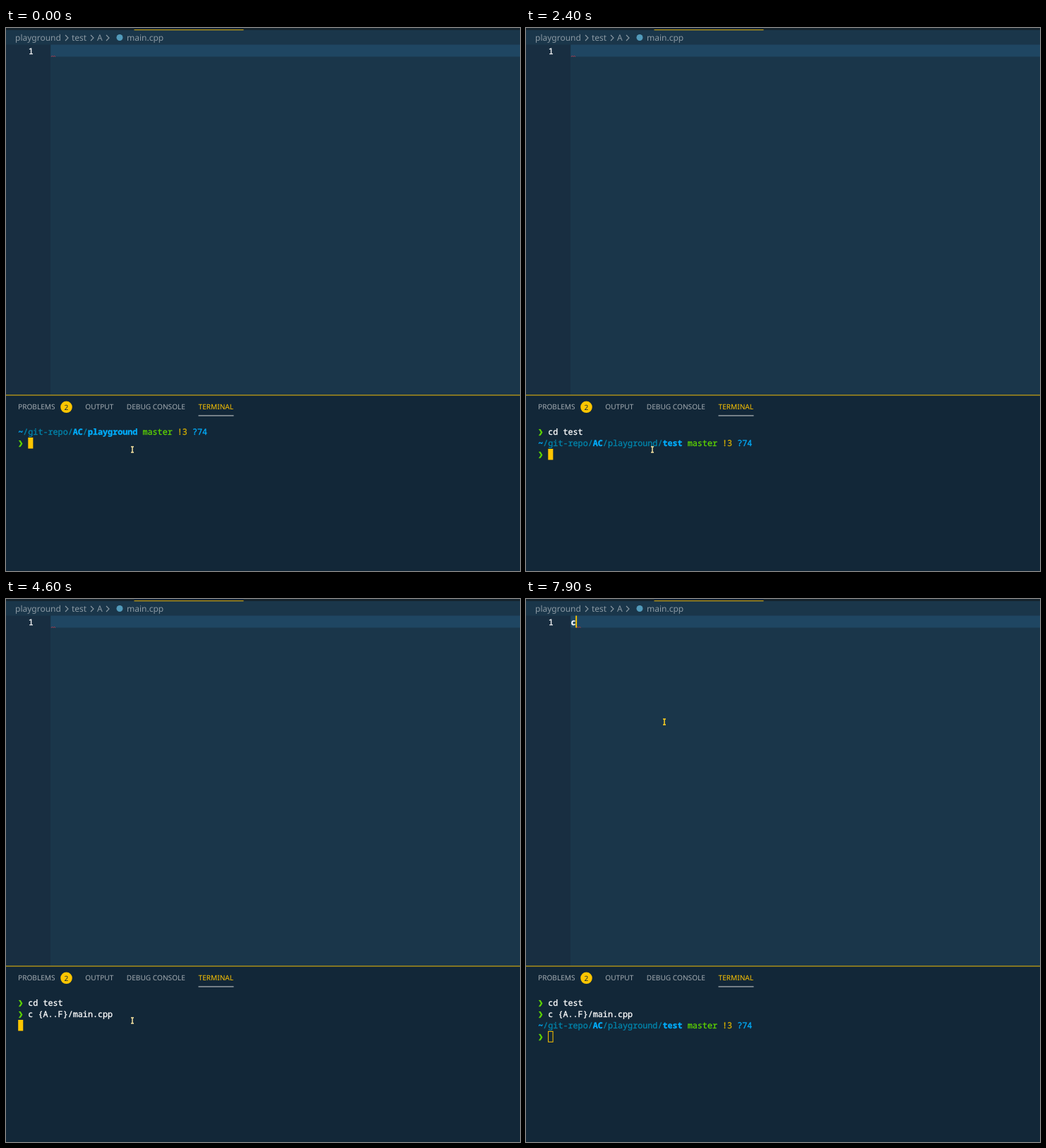
An HTML page for the animation above (8 s loop, 728 px wide and 769 px high).

```html
<!DOCTYPE html>
<html lang="en">
<head>
<meta charset="utf-8">
<title>Editor and terminal</title>
<style>
html, body { margin: 0; width: 100%; height: 100%; overflow: hidden; background: #1a364a; }
svg { display: block; width: 728px; height: 769px; }
text { white-space: pre; text-rendering: geometricPrecision; fill: currentColor; }
.crumb { font: 12px "Noto Sans", sans-serif; color: #8b99a3; }
.tab { font: 10.15px "Noto Sans", sans-serif; color: #a3abb1; }
.mono { font: 11.75px "Noto Sans Mono", "DejaVu Sans Mono", monospace; color: #fff; stroke: currentColor; stroke-width: .3; }
.mono text { stroke: currentColor; }
.bold { font-weight: 700; }
.dim { color: #0087af; }
.dir { color: #00afff; font-weight: 700; }
.new { color: #00afff; }
.ok { color: #5fd700; }
.mark { color: #5fd700; font-weight: 700; stroke-width: .6; }
.mod { color: #d7af00; }
.hint { color: #0050a4; }
.gold { color: #ffc600; }
.dark { color: #122738; }
.line { fill: none; stroke: #8b99a3; stroke-width: 1.1; }
</style>
</head>
<body>
<svg viewBox="0 0 728 769">
  <rect width="728" height="769" fill="#1a364a"/>
  <rect width="728" height="3" fill="#15232d"/>
  <rect x="181.5" y="2.2" width="155" height="1" fill="#e6b60a"/>
  <rect y="23.5" width="63" height="496" fill="#182e41"/>
  <rect x="63.3" y="23.6" width="665" height="17" fill="#1f4662"/>

  <g class="crumb">
    <text x="13" y="18">playground</text>
    <text x="93" y="18">test</text>
    <text x="129" y="18">A</text>
    <text x="171" y="18">main.cpp</text>
  </g>
  <path class="line" d="M84 10l4 4-4 4M120 10l4 4-4 4M142 10l4 4-4 4"/>
  <circle cx="161" cy="13.5" r="4.5" fill="#519aba"/>

  <text class="mono" x="31.8" y="37.3">1</text>
  <path id="squiggle" d="M64 41l1.5-1.8 1.5 1.6 1.5-1.6 1.5 1.8" fill="none" stroke="#b03a48" stroke-width=".9"/>
  <text id="typed" class="mono bold" x="63.5" y="37">c</text>
  <rect id="caret" y="23.6" width="1.8" height="17" fill="#ffc600"/>

  <rect y="520" width="728" height="249" fill="#122738"/>
  <rect y="519.5" width="728" height="1" fill="#f0bc06"/>
  <g class="tab">
    <text x="17" y="540">PROBLEMS</text>
    <text x="112.3" y="540">OUTPUT</text>
    <text x="170.8" y="540">DEBUG CONSOLE</text>
    <text class="gold" x="272.5" y="540">TERMINAL</text>
  </g>
  <circle cx="85.5" cy="536.8" r="8.3" fill="#ffc600"/>
  <text class="tab dark" x="85.5" y="540.6" text-anchor="middle">2</text>
  <rect x="272.5" y="548.5" width="50" height="1" fill="#d5d8d6"/>

  <g id="term" class="mono"></g>
  <rect id="block"/>
  <path id="mouse" d="M-2-4h4M0-4v8M-2 4h4" fill="none" stroke-width="1.5"/>
</svg>
<script>
const LOOP = 8000, LEFT = 17.2, TOP = 564, CELL = 7.05, ROW = 16;
const $ = id => document.getElementById(id);
const set = (el, attrs) => { for (const k in attrs) el.setAttribute(k, attrs[k]); };

// A row is a list of [class, text] runs.
const status = [['ok', ' master'], ['mod', ' !3'], ['new', ' ?74']];
const home = [['dir', '~'], ['dim', '/git-repo/'], ['dir', 'AC'], ['dim', '/'], ['dir', 'playground'], ...status];
const inner = [['dir', '~'], ['dim', '/git-repo/'], ['dir', 'AC'], ['dim', '/playground/'], ['dir', 'test'], ...status];
const cmd = (text = '', hint = '') =>
  [['mark', '❯ '], [text === 'c' ? 'bold' : '', text], ['hint', hint]];

const file = 'c {A..F}/main.cpp';
const first = (text, hint) => ({ rows: [home, cmd(text, hint)], col: 2 + text.length, row: 1 });
const second = (text, hint) => ({ rows: [cmd('cd test'), inner, cmd(text, hint)], col: 2 + text.length, row: 2 });
const done = { rows: [cmd('cd test'), cmd(file), inner, cmd()], col: 2, row: 3 };

const steps = [
  [0, first('')],
  [1300, first('c', file.slice(1))],
  [1600, first('cd')],
  [1700, first('cd ')],
  [1900, first('cd t')],
  [2000, first('cd te')],
  [2100, first('cd test')],
  [2400, second('')],
  [2800, second('c', 'd test')],
  [3000, second('c ', file.slice(2))],
  [3200, second('c {', file.slice(3))],
  [4100, second(file)],
  [4600, { rows: [cmd('cd test'), cmd(file)], col: 0, row: 2 }],
  [4800, done],
  [5100, { ...done, hollow: true }]
];

const moves = [
  [0, 179, 597], [5500, 173.5, 580.5], [5600, 176, 520], [5700, 185, 430],
  [5800, 196, 330], [5900, 204, 245], [6000, 201, 195], [6100, 196, 174]
];

const at = (list, t) => list.findLast(item => item[0] <= t);

function drawTerminal({ rows, col, row, hollow }) {
  $('term').replaceChildren();
  rows.forEach((runs, r) => {
    let c = 0;
    for (const [cls, text] of runs) {
      const el = document.createElementNS('http://www.w3.org/2000/svg', 'text');
      const lead = text.length - text.trimStart().length;
      set(el, { class: cls, x: LEFT + (c + lead) * CELL, y: TOP + r * ROW + 12 });
      el.textContent = text.trim();
      $('term').append(el);
      c += text.length;
    }
  });
  const x = LEFT + col * CELL, y = TOP + row * ROW;
  set($('block'), hollow
    ? { x: x + .3, y: y + .4, width: 6.5, height: 14.9, fill: 'none', stroke: '#ffc600' }
    : { x, y, width: CELL, height: 15.6, fill: '#ffc600', stroke: 'none' });
}

let shown;
function frame(now) {
  const t = now % LOOP;
  const state = at(steps, t)[1];
  if (state !== shown) drawTerminal(shown = state);

  const [start, x, y] = at(moves, t);
  set($('mouse'), { transform: `translate(${x} ${y})`, stroke: start ? '#ffd21f' : '#f6e2a0' });

  const typed = t >= 7900;
  const blink = t >= 5100 && t < 5500 || t >= 6000 && t % 1000 < 500;
  set($('typed'), { visibility: typed ? 'visible' : 'hidden' });
  set($('caret'), { x: typed ? 70.3 : 63.3, visibility: typed || blink ? 'visible' : 'hidden' });
  set($('squiggle'), { transform: `translate(${typed ? 7.5 : 0} 0)` });
}

function tick() {
  frame(performance.now());
  requestAnimationFrame(tick);
}
tick();
</script>
</body>
</html>
```
